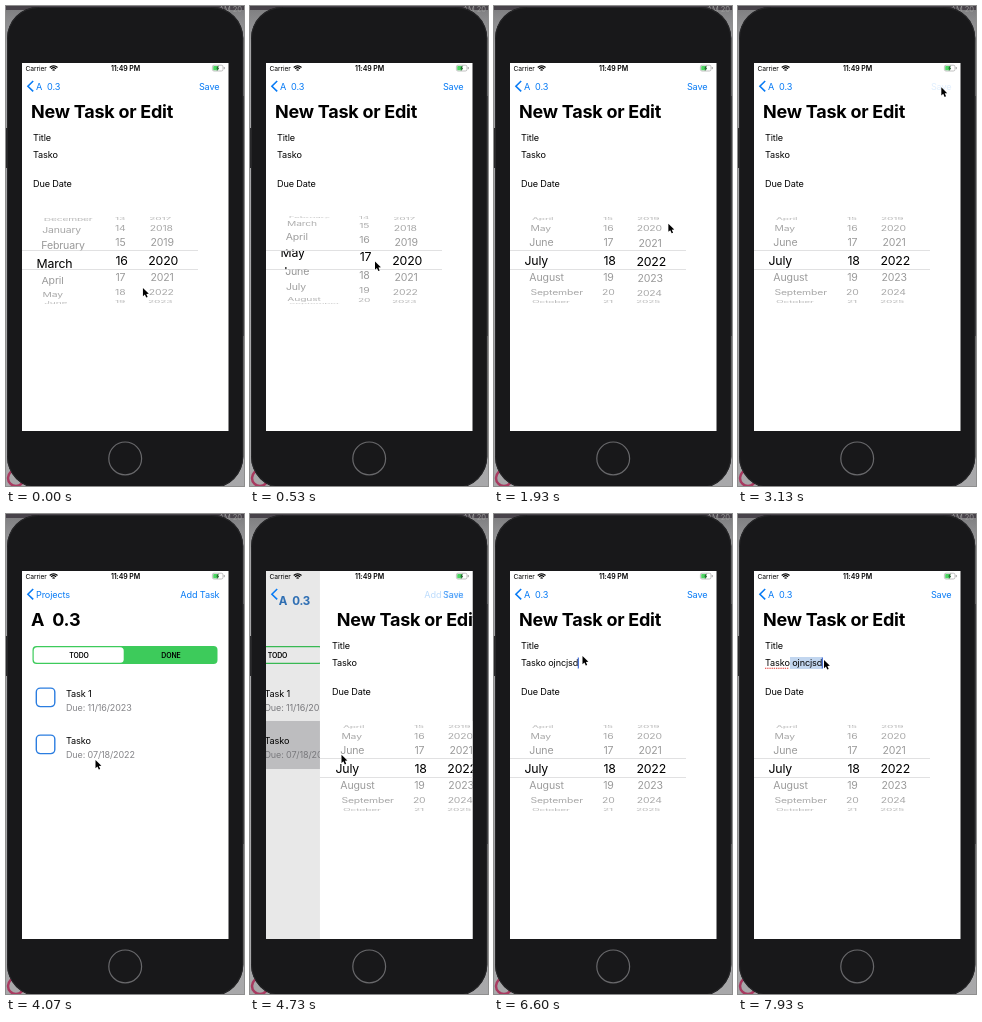
An HTML page with a canvas that plays this animation: 238x480 px, repeating every 8 s.

```html
<!DOCTYPE html>
<html lang="en">
<head>
<meta charset="utf-8">
<title>Task editor</title>
<style>
html, body { margin: 0; width: 100%; height: 100%; overflow: hidden; background: #999; }
canvas { display: block; width: 238px; height: 480px; }
</style>
</head>
<body>
<canvas id="stage"></canvas>
<script>
const LOOP = 8000, BLUE = '#087bf5', GREEN = '#3dcb5b';
const MONTHS = ['January', 'February', 'March', 'April', 'May', 'June', 'July',
  'August', 'September', 'October', 'November', 'December'];
const stage = document.getElementById('stage');
const c = stage.getContext('2d');
const ratio = window.devicePixelRatio || 1;
stage.width = 238 * ratio;
stage.height = 480 * ratio;

const clamp = v => Math.max(0, Math.min(1, v));
const mix = (a, b, p) => a + (b - a) * p;

// Keys are [time, value, value...]
function track(keys, t) {
  let i = 0;
  while (i < keys.length - 1 && keys[i + 1][0] <= t) i++;
  const a = keys[i], b = keys[i + 1] || a;
  const p = a === b ? 0 : clamp((t - a[0]) / (b[0] - a[0]));
  return a.slice(1).map((v, k) => mix(v, b[k + 1], p));
}

// Critically damped navigation spring
function spring(t, start) {
  const s = (t - start) / 1000;
  if (s <= 0) return 0;
  return s > 0.73 ? 1 : 1 - (1 + 10 * s) * Math.exp(-10 * s);
}

const monthKeys = [[0, 1.86], [400, 4], [800, 5.25], [1200, 5.76], [1600, 6]];
const dayKeys = [[200, 16], [720, 17.85], [930, 18]];
const yearKeys = [[1330, 2020], [1720, 2021.85], [2000, 2022]];
const mouseKeys = [[0, 137, 282], [200, 125, 280], [700, 125, 243], [870, 134, 246],
  [1200, 163.5, 260], [1330, 170, 257], [1730, 174, 218], [2270, 175, 217],
  [2650, 192, 130], [3070, 204, 80], [3250, 202, 84], [3560, 140, 180], [3870, 89.5, 246],
  [4200, 89.5, 246], [4470, 91, 246], [4730, 91.5, 241], [5200, 89, 146], [5330, 88.5, 142],
  [7400, 88.5, 142], [7730, 86, 146]];

function text(s, x, y, { size = 9.15, color = '#000', weight = 400, align = 'left', alpha = 1 } = {}) {
  if (alpha <= 0) return;
  c.save();
  c.globalAlpha *= alpha;
  c.font = `${weight} ${size}px Inter, "Liberation Sans", sans-serif`;
  c.letterSpacing = -0.014 * size + 'px';
  c.textAlign = align;
  c.fillStyle = color;
  c.fillText(s, x, y);
  c.restore();
}

function rect(x, y, w, h, fill, r = 0) {
  c.beginPath();
  c.roundRect(x, y, w, h, r);
  c.fillStyle = fill;
  c.fill();
}

function box(x, y, w, h, r, color, width) {
  c.beginPath();
  c.roundRect(x, y, w, h, r);
  c.strokeStyle = color;
  c.lineWidth = width;
  c.stroke();
}

function line(color, width, ...points) {
  c.beginPath();
  points.forEach(p => c.lineTo(...p));
  c.strokeStyle = color;
  c.lineWidth = width;
  c.stroke();
}

function clipped(x, y, w, h, draw) {
  c.save();
  c.beginPath();
  c.rect(x, y, w, h);
  c.clip();
  draw();
  c.restore();
}

// Picker column: small grey rows on a drum, large black rows in the centre band
function wheel(value, label, x, bigX, align) {
  const mid = 254.3, top = 245, bottom = 263.5, near = Math.round(value);
  const rows = () => {
    for (let i = near - 4; i <= near + 4; i++) {
      const angle = (i - value) * 0.41, depth = Math.cos(angle);
      if (depth < 0.05) continue;
      const s = 1 - 0.065 * (1 - depth);
      c.save();
      c.translate(104, mid + 44 * Math.sin(angle));
      c.scale(s, depth);
      text(label(i), x - 104, 3.9, { size: 10.6, align, alpha: 0.2 + 0.22 * depth });
      c.restore();
    }
  };
  clipped(15, 205, 207, top - 205, rows);
  clipped(15, bottom, 207, 302 - bottom, rows);
  clipped(15, top, 207, bottom - top, () => {
    for (let i = near - 1; i <= near + 1; i++)
      text(label(i), bigX, mid + (i - value) * 19.5 + 4.6, { size: 12.3, align });
  });
}

function field(t) {
  const typed = ' ojncjsd'.slice(0, Math.max(0, Math.floor((t - 6330) / 67) * 2));
  if (t >= 7930) rect(52, 143, 32.5, 12, '#c2d6ef');
  text('Tasko' + typed, 27, 152);
  if (t >= 6930) {
    c.setLineDash([1.3, 0.9]);
    line('#e5322d', 1.1, [27, 154.3], [51, 154.3]);
    c.setLineDash([]);
  }
  if (t >= 5470) {
    const x = 51.5 + typed.length * 4.1;
    c.globalAlpha = clamp((t - 5400) / 300);
    line('#315fd4', 1.1, [x, 143.5], [x, 154.5]);
    c.globalAlpha = 1;
  }
}

function form(t) {
  rect(15, 57, 208, 368, '#fff');
  text('Title', 27, 135.3);
  field(t);
  text('Due Date', 27, 181);
  wheel(track(monthKeys, t)[0], i => MONTHS[(i + 12) % 12], 35, 30.5, 'left');
  wheel(track(dayKeys, t)[0], String, 114.5, 115.6, 'center');
  wheel(track(yearKeys, t)[0], String, 156.4, 157.2, 'center');
  for (const y of [244.5, 263.5]) line('#d4d4d6', 0.7, [15, y], [192, y]);
}

function task(name, due, y) {
  box(30.3, y - 9.5, 18.5, 18.5, 4, '#2b7de0', 1.4);
  text(name, 60, y - 0.6);
  text('Due: ' + due, 60, y + 13.5, { size: 9, color: '#858589' });
}

function list(picked) {
  rect(15, 57, 270, 368, '#fff');
  if (picked) rect(15, 207, 270, 48, '#d0d0d2');
  rect(26.5, 132, 185, 18, GREEN, 4);
  rect(27.7, 133.2, 90, 15.6, '#fff', 3.5);
  const tab = { size: 6.9, weight: 600, align: 'center' };
  text('TODO', 73, 143.6, tab);
  text('DONE', 165, 143.6, tab);
  task('Task 1', '11/16/2023', 183.6);
  task('Tasko', '07/18/2022', 230.6);
}

function statusBar() {
  text('Carrier', 19.5, 64.7, { size: 6.7 });
  text('11:49 PM', 119.5, 64.8, { size: 7, weight: 600, align: 'center' });
  for (const r of [2, 4, 6]) {
    c.beginPath();
    c.arc(47.6, 65.4, r - 0.5, -Math.PI * 0.75, -Math.PI * 0.25);
    c.strokeStyle = '#000';
    c.lineWidth = 1.2;
    c.stroke();
  }
  box(206.4, 59.2, 10.6, 5.8, 1.6, '#999', 0.6);
  rect(207.2, 60, 5, 4.2, '#4cd562', 0.8);
  rect(217.8, 61, 0.9, 2.2, '#999', 0.4);
  line('#173d1e', 0.8, [212.5, 59.8], [210.8, 62.3], [212.6, 62], [211.2, 64.5]);
}

function navBar(p, saveAlpha) {
  line(BLUE, 1.6, [27.2, 75], [21.9, 80.2], [27.2, 85.4]);
  const nav = { color: BLUE };
  text('Projects', 30 - 40 * p, 83.5, { ...nav, alpha: 1 - 2.5 * p });
  const size = mix(18, 9.15, p), x = mix(25, 30, p), y = mix(112, 83.5, p);
  text('A  0.3', x, y, { size, weight: p < 0.9 ? 700 : 400, color: BLUE, alpha: p });
  text('A  0.3', x, y, { size, weight: 700, alpha: 1 - p });
  text('Add Task', 213.5, 83.5, { ...nav, align: 'right', alpha: 1 - p });
  text('Save', 213.5, 83.5, { ...nav, align: 'right', alpha: p * saveAlpha });
  text('New Task or Edit', 25 + 233 * (1 - p), 112, { size: 18, weight: 700, alpha: clamp(3 * p) });
}

function phone() {
  const wall = c.createLinearGradient(0, 0, 0, 480);
  wall.addColorStop(0, '#7c7c7e');
  wall.addColorStop(0.08, '#a2a2a4');
  wall.addColorStop(1, '#a8a8aa');
  rect(0, 0, 238, 480, wall);
  rect(0, 0, 238, 4, '#48434a');
  text('AM 20', 213, 6, { size: 7.5, color: '#999' });
  rect(0, 122, 4, 40, '#29292b');
  rect(234, 90, 4, 240, '#5f5f62');
  c.beginPath();
  c.arc(10, 472, 8, 0, 7);
  c.strokeStyle = '#a83a60';
  c.lineWidth = 2.5;
  c.stroke();
  rect(1, 1, 236.3, 481, '#18181a', 31);
  box(1.5, 1.5, 235.3, 480, 31, '#2a2a2c', 0.9);
  c.beginPath();
  c.arc(119.2, 452.4, 16.4, 0, 7);
  c.strokeStyle = '#68686b';
  c.lineWidth = 1.2;
  c.stroke();
}

function mouse(x, y) {
  c.beginPath();
  [[0, 0], [0, 8.2], [1.9, 6.5], [3.3, 9.6], [4.7, 9], [3.4, 6], [5.9, 5.8]]
    .forEach(([dx, dy]) => c.lineTo(x + dx, y + dy));
  c.closePath();
  c.lineJoin = 'round';
  c.strokeStyle = '#fff';
  c.lineWidth = 1;
  c.stroke();
  c.fillStyle = '#000';
  c.fill();
  c.lineJoin = 'miter';
}

function draw(t) {
  c.setTransform(ratio, 0, 0, ratio, 0, 0);
  const p = t < 4300 ? 1 - spring(t, 3140) : spring(t, 4470);
  const saveAlpha = t < 4300 ? 1 - 0.88 * clamp((t - 3000) / 70) : 1;
  phone();
  clipped(16, 57, 206.5, 368, () => {
    if (p < 1) {
      c.save();
      c.translate(-62 * p, 0);
      list(t >= 4400);
      c.restore();
      rect(15, 57, 208, 368, `rgba(0,0,0,${0.125 * p})`);
    }
    if (p > 0) {
      c.save();
      c.translate(207 * (1 - p), 0);
      form(t);
      c.restore();
    }
    navBar(p, saveAlpha);
    statusBar();
  });
  mouse(...track(mouseKeys, t));
}

const begin = performance.now();
function tick() {
  draw((performance.now() - begin) % LOOP);
  requestAnimationFrame(tick);
}
tick();
</script>
</body>
</html>
```
